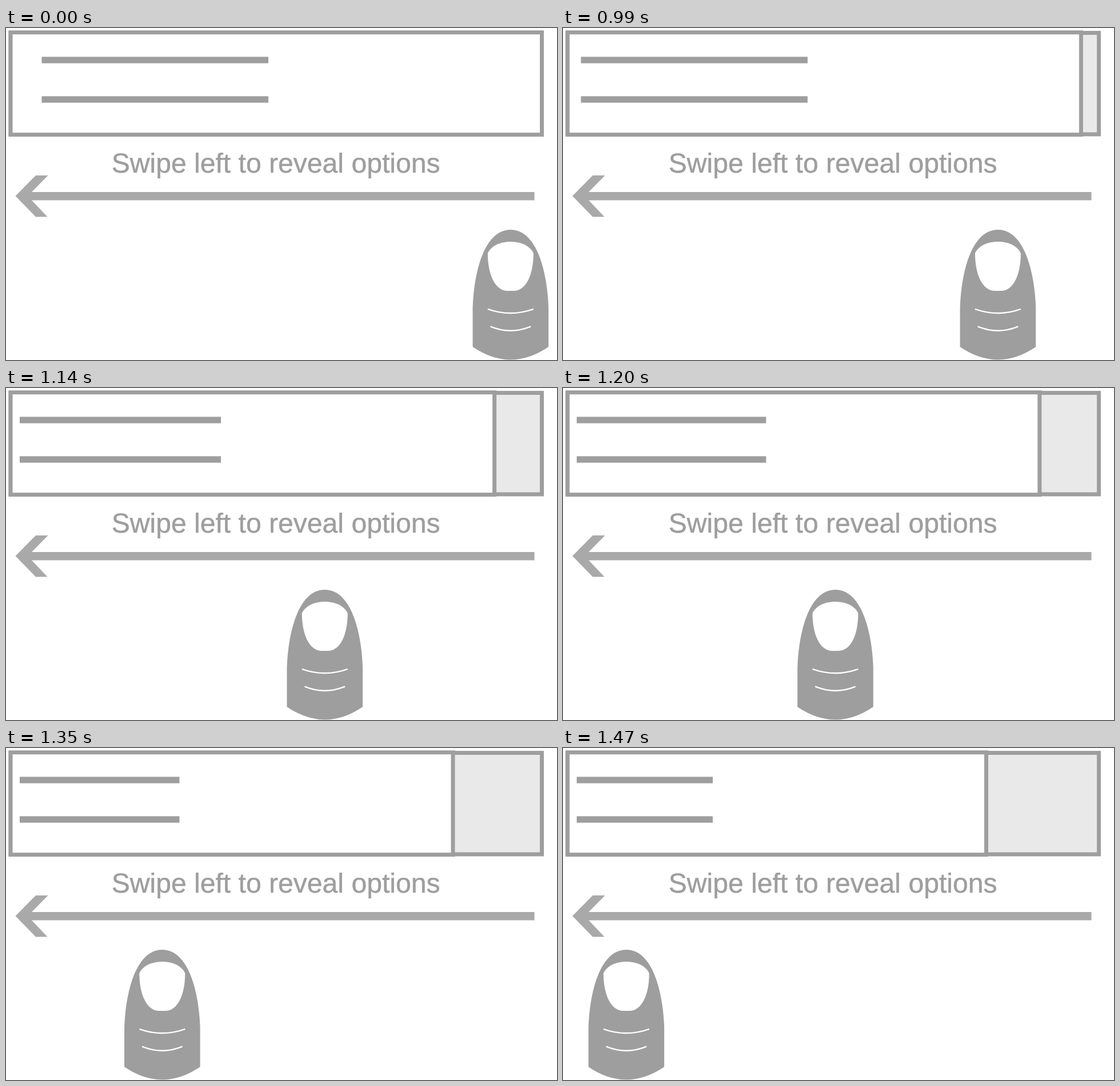
An HTML page that plays this animation: 964x581 px, repeating every 2240 ms.

```html
<!DOCTYPE html>
<html lang="en">
<head>
<meta charset="utf-8">
<title>Swipe left</title>
<style>
  html, body { margin: 0; width: 100%; height: 100%; overflow: hidden; background: #fff; }
  svg { display: block; width: 964px; height: 581px; }
  text {
    font: 48.1px "Liberation Sans", Arial, sans-serif;
    fill: #9e9e9e; stroke: #9e9e9e; stroke-width: .5;
    text-rendering: geometricPrecision;
  }
  .frame { stroke: #9e9e9e; stroke-width: 7; }
  .gray { fill: #9e9e9e; }
  .crease { fill: none; stroke: #fff; stroke-width: 2.4; }
</style>
</head>
<body>
<svg viewBox="0 0 964 581">
  <rect class="frame" x="8" y="8.5" width="929.5" height="177.5" fill="#e9e9e9"/>
  <rect class="frame" id="card" x="8" y="7.7" width="929.5" height="179" fill="#fff"/>
  <rect class="gray bar" y="50.4" height="11.3"/>
  <rect class="gray bar" y="119.4" height="11.3"/>
  <text x="184.7" y="252.7">Swipe left to reveal options</text>
  <path fill="#a9a9a9" d="M16.5 294 L52 258 H73.5 L45 287 H924.5 V301.5 H45 L72.5 330.5 H52 Z"/>
  <g id="thumb">
    <path class="gray" d="M-66.3 558 V490 C-64.5 430 -47 353 0 353 C47 353 64.5 430 66.3 490 V558 Q0 603 -66.3 558 Z"/>
    <path fill="#fff" d="M-40 394 C-33 380 -17 374 0 374 C17 374 33 380 40 394 C40 430 28 460 5 460 H-5 C-28 460 -40 430 -40 394 Z"/>
    <path class="crease" d="M-40 491.9 Q0 506.2 40 491.9"/>
    <path class="crease" d="M-35.3 522.4 Q0 537 35.3 522.4"/>
  </g>
</svg>
<script>
  const LOOP = 2240, START = 930, STEP = 30, STEPS = 19;
  const card = document.getElementById("card");
  const thumb = document.getElementById("thumb");
  const bars = document.querySelectorAll(".bar");

  function draw(time) {
    const t = time % LOOP;
    const n = t < START ? 0 : Math.min(STEPS, Math.floor((t - START) / STEP) + 1);
    const slide = 197 * n / STEPS;
    const left = Math.max(24, 62.5 - slide);
    card.setAttribute("width", 929.5 - slide);
    for (const bar of bars) {
      bar.setAttribute("x", left);
      bar.setAttribute("width", 459 - slide - left);
    }
    thumb.setAttribute("transform", `translate(${882.8 - 772 * n / STEPS} 0)`);
  }

  const begin = performance.now();
  function tick() {
    draw(performance.now() - begin);
    requestAnimationFrame(tick);
  }
  tick();
</script>
</body>
</html>
```
